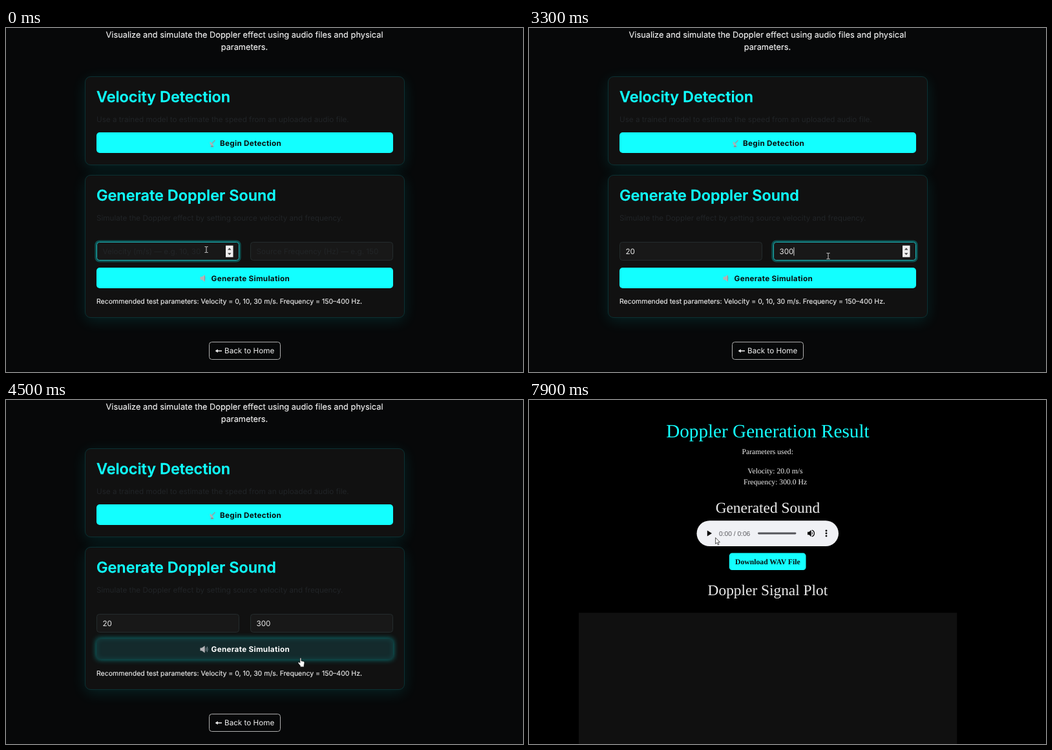
These frames come from a looping animation (800 px wide and 534 px high, 8 s). An HTML page:

```html
<!DOCTYPE html>
<html lang="en">
<head>
<meta charset="utf-8">
<title>Doppler simulator</title>
<style>
html, body { margin: 0; width: 100%; height: 100%; overflow: hidden; background: #000; }
#stage { position: relative; width: 800px; height: 534px; overflow: hidden; }
.page, .page svg, #pointer { position: absolute; left: 0; top: 0; width: 800px; height: 534px; }
.page div { position: absolute; box-sizing: border-box; }
svg { overflow: hidden; }
text { white-space: pre; text-rendering: geometricPrecision; }

#form { background: #070809; font-family: Inter, sans-serif; font-optical-sizing: none; }
#result { background: #000; font-family: "Liberation Serif", "Times New Roman", serif; }

.card {
  left: 122px; width: 495px; background: #111; border: 1px solid #0b3133; border-radius: 9px;
  box-shadow: 0 5px 22px rgba(0, 255, 255, .11);
}
.button { left: 140px; width: 459px; height: 32px; border-radius: 5px; background: #12ffff; }
.field { top: 332px; width: 221px; height: 29px; border-radius: 4.5px; background: #181818; border: 1px solid; }
.back { left: 314px; top: 487px; width: 111px; height: 28px; border: 1px solid #b0b0b0; border-radius: 4.5px; }

.lead { font-size: 12.8px; fill: #f0f0f0; stroke: #f0f0f0; stroke-width: .15px; text-anchor: middle; }
.head { font-size: 23.4px; font-weight: 600; fill: #10ffff; stroke: #10ffff; stroke-width: .25px; }
.body { font-size: 11.68px; }
.note { font-size: 10.51px; fill: #ececec; stroke: #ececec; stroke-width: .15px; }
.faint { fill: #212427; }
.label { font-size: 11.68px; font-weight: 700; letter-spacing: .3px; fill: #0a0d0e; }

.mid { text-anchor: middle; }
.h1 { font-size: 29.2px; fill: #14ffff; }
.h2 { font-size: 23.36px; fill: #ebebeb; }
.p { font-size: 11.68px; fill: #f2f2f2; }
.save { font-size: 11.68px; font-weight: 700; fill: #061010; }
.clock { font-family: "Liberation Sans", Arial, sans-serif; font-size: 10.22px; fill: #5a5a5e; }
</style>
</head>
<body>
<div id="stage">
  <div class="page" id="form">
    <div class="card" style="top:75px;height:138px"></div>
    <div class="card" style="top:228px;height:222px"></div>
    <div class="button" style="top:162px"></div>
    <div class="button" id="generate" style="top:372px"></div>
    <div class="field" id="speedBox" style="left:140px"></div>
    <div class="field" id="pitchBox" style="left:378px"></div>
    <div class="back"></div>
    <svg viewBox="0 0 800 534">
      <g class="lead">
        <text x="369" y="15">Visualize and simulate the Doppler effect using audio files and physical</text>
        <text x="369" y="34.2">parameters.</text>
      </g>
      <text class="head" x="140" y="115.4">Velocity Detection</text>
      <text class="head" x="140" y="268.4">Generate Doppler Sound</text>
      <text class="body faint" x="140" y="146">Use a trained model to estimate the speed from an uploaded audio file.</text>
      <text class="body faint" x="140" y="299">Simulate the Doppler effect by setting source velocity and frequency.</text>

      <path d="M316 176L322 182.5Q317.5 184 315.8 180.5Q315 178 316 176Z" fill="#a9b4b8"/>
      <path d="M319 179L323.5 174.3" stroke="#8fa0a4" stroke-width="1.6"/>
      <path d="M317.5 182.5L316.5 185H321.5L320 182.5Z" fill="#87969a"/>
      <text class="label" x="331" y="182.7">Begin Detection</text>

      <g id="action">
        <path d="M300.5 386.2H303L307.6 383V394L303 390.8H300.5Z" fill="#b3b3b7"/>
        <path d="M307.2 383.3Q309.5 388.5 307.2 393.7Z" fill="#8b8b90"/>
        <path id="waves" d="M309.6 385.8Q311 388.5 309.6 391.2M311.2 384.3Q313.2 388.5 311.2 392.7"
          fill="none" stroke="#7f8f96" stroke-width="1"/>
        <text id="actionText" class="label" x="317.6" y="392.6">Generate Simulation</text>
      </g>

      <text class="body" id="speedText" x="149.5" y="351"></text>
      <text class="body" id="pitchText" x="387.5" y="351"></text>
      <rect id="caret" y="340.5" width="1" height="13" fill="#d8d8d8"/>
      <g id="spinner">
        <rect x="340" y="337.7" width="11.5" height="18" fill="#efefef"/>
        <path d="M343 344.4L345.75 341.2L348.5 344.4ZM343 349.2L345.75 352.4L348.5 349.2Z" fill="#444"/>
      </g>
      <text class="note" x="140" y="427.7">Recommended test parameters: Velocity = 0, 10, 30 m/s. Frequency = 150–400 Hz.</text>
      <path d="M334 501.3H326.5" stroke="#f0f0f0" stroke-width="1.5"/>
      <path d="M323.6 501.3L327.8 498.6V504Z" fill="#f0f0f0"/>
      <text class="body" x="338" y="505.3" fill="#f0f0f0">Back to Home</text>
    </svg>
  </div>

  <div class="page" id="result">
    <svg viewBox="0 0 800 534">
      <g id="scroll">
        <g class="mid">
          <text class="h1" x="369.4" y="61">Doppler Generation Result</text>
          <text class="p" x="369.2" y="87.3">Parameters used:</text>
          <text class="p" x="381" y="116.7">Velocity: 20.0 m/s</text>
          <text class="p" x="381" y="134.3">Frequency: 300.0 Hz</text>
          <text class="h2" x="369.4" y="178">Generated Sound</text>
          <text class="h2" x="369.4" y="306.3">Doppler Signal Plot</text>
        </g>
        <rect x="259.5" y="190.3" width="219.5" height="39.7" rx="19.85" fill="#f0f1f5"/>
        <path d="M275.8 205.6V214.4L283 210Z" fill="#050505"/>
        <text class="clock" x="294" y="213.8">0:00 / 0:06</text>
        <path d="M355.5 210H412" stroke="#55555a" stroke-width="2.9" stroke-linecap="round"/>
        <path d="M431 207.8H433.4L436.6 204.8V215.2L433.4 212.2H431Z" fill="#050505"/>
        <path d="M437.8 207.3Q440 210 437.8 212.7Z" fill="#050505"/>
        <path d="M437.8 205.2A5 5 0 0 1 437.8 214.8" fill="none" stroke="#050505" stroke-width="1.3"/>
        <g fill="#050505">
          <circle cx="460" cy="205.9" r="1.45"/>
          <circle cx="460" cy="210" r="1.45"/>
          <circle cx="460" cy="214.1" r="1.45"/>
        </g>
        <rect x="309.8" y="240.6" width="118.7" height="26.4" rx="4.4" fill="#14ffff"/>
        <text class="save mid" x="369.3" y="257.8">Download WAV File</text>
        <rect x="77" y="333.3" width="585.3" height="240" fill="#101010"/>
      </g>
    </svg>
  </div>

  <svg id="pointer" viewBox="0 0 800 534">
    <g id="beam" fill="none" stroke="#cfcfcf" stroke-width="1">
      <path d="M-2.5 -4.5H-.7L0 -4L.7 -4.5H2.5M0 -4V4M-2.5 4.5H-.7L0 4L.7 4.5H2.5"/>
    </g>
    <g id="hand">
      <path transform="scale(1.12)" fill="#fff" stroke="#111" stroke-width=".5" stroke-linejoin="round"
        d="M-1.8 -5.6Q-1 -6.6 -.2 -5.6V-1.8L3.2 -1Q4.4 -.6 4.3 .8L3.6 4.2V6.4H-1.4V5L-4.4 1.2Q-4.6 -.4 -3.2 0L-1.8 1.2Z"/>
    </g>
    <path id="arrow" fill="#fff" stroke="#222" stroke-width=".8" stroke-linejoin="round"
      d="M0 0V9.6L2.2 7.6L3.8 11.2L5.3 10.5L3.8 7.1H6.8Z"/>
  </svg>
</div>

<script>
const LOOP = 8000, STEP = 100;
const PITCH_FOCUS = 1500, HOVER = 3500, CLICK = 3900, LOADED = 4600, SCROLL = 7900;
const SPEED_TYPED = [400, 600], PITCH_TYPED = [1900, 2000, 2200];

// time, x, y
const PATH = [
  [0, 310, 344], [900, 310, 344], [1400, 462, 344], [2900, 462, 344], [3300, 463, 354],
  [3700, 457, 407], [4599, 457, 407], [4600, 455.5, 400.3], [4800, 455.5, 400.3],
  [5800, 276.7, 211], [7200, 276.7, 211], [7700, 288.6, 213.7], [LOOP, 288.6, 213.7]
];

const el = id => document.getElementById(id);
const show = (id, on) => { el(id).style.display = on ? "" : "none"; };
const clamp = v => Math.max(0, Math.min(1, v));
const mix = (a, b, k) => a + (b - a) * k;
const blend = (a, b, k) => `rgb(${a.map((v, i) => Math.round(mix(v, b[i], k)))})`;

function pointerAt(t) {
  const i = Math.max(1, PATH.findIndex(p => p[0] > t));
  const [t0, x0, y0] = PATH[i - 1], [t1, x1, y1] = PATH[i];
  const u = (t - t0) / (t1 - t0), k = u * u * (3 - 2 * u);
  return [mix(x0, x1, k), mix(y0, y1, k)];
}

function typed(word, times, t) {
  return word.slice(0, times.filter(at => at <= t).length);
}

function drawField(name, value, hint, focused, lit) {
  const text = el(name + "Text"), box = el(name + "Box").style;
  text.textContent = value || hint;
  text.setAttribute("fill", value ? "#e8e8e8" : "#222527");
  box.borderColor = blend([36, 44, 45], [30, 178, 180], lit);
  box.boxShadow = focused ? "0 0 0 2.6px rgba(0,255,255,.27)" : "none";
}

function drawCaret(t, onPitch, value) {
  const since = onPitch
    ? Math.max(PITCH_FOCUS, ...PITCH_TYPED.filter(at => at <= t))
    : Math.max(-500, ...SPEED_TYPED.filter(at => at <= t));
  const left = onPitch ? 387.5 : 149.5;
  const width = value ? el(onPitch ? "pitchText" : "speedText").getComputedTextLength() : 0;
  el("caret").setAttribute("x", left + width);
  show("caret", t < CLICK && Math.floor((t - since) / 500) % 2 === 0);
}

function drawButton(t) {
  const k = clamp((t - HOVER) / 300), s = el("generate").style;
  s.background = blend([18, 255, 255], [20, 42, 44], k);
  s.transform = `translateY(${-1.5 * k}px)`;
  s.boxShadow = `0 0 9px rgba(0,255,255,${.5 * k}), inset 0 0 8px rgba(0,255,255,${.12 * k})`;
  el("action").setAttribute("transform", `translate(0 ${-1.5 * k})`);
  el("actionText").style.fill = blend([10, 13, 14], [255, 255, 255], k);
  el("waves").setAttribute("opacity", k);
}

function drawForm(t) {
  const onPitch = t >= PITCH_FOCUS, focused = t < CLICK;
  const speed = typed("20", SPEED_TYPED, t), pitch = typed("300", PITCH_TYPED, t);
  const rise = clamp((t - PITCH_FOCUS) / 200);
  drawField("speed", speed, "Velocity (m/s) — e.g. 10, 30", !onPitch, 1 - clamp((t - PITCH_FOCUS) / 250));
  drawField("pitch", pitch, "Source Frequency (Hz) — e.g. 150", onPitch && focused,
    focused ? rise : 1 - clamp((t - CLICK) / 300));
  drawCaret(t, onPitch, onPitch ? pitch : speed);
  el("spinner").setAttribute("transform", `translate(${onPitch ? 238 : 0} 0)`);
  show("spinner", focused);
  drawButton(t);
}

function render(t) {
  const loaded = t >= LOADED;
  show("form", !loaded);
  show("result", loaded);
  if (!loaded) drawForm(t);
  el("scroll").setAttribute("transform", `translate(0 ${t >= SCROLL ? -3 : 0})`);

  const kind = loaded ? "arrow" : t >= HOVER ? "hand" : "beam";
  for (const id of ["beam", "hand", "arrow"]) show(id, id === kind);
  el(kind).setAttribute("transform", `translate(${pointerAt(t)})`);
}

const start = performance.now();
function tick() {
  const t = Math.max(0, performance.now() - start) % LOOP;
  render(Math.floor(t / STEP) * STEP);
  requestAnimationFrame(tick);
}
tick();
</script>
</body>
</html>
```
